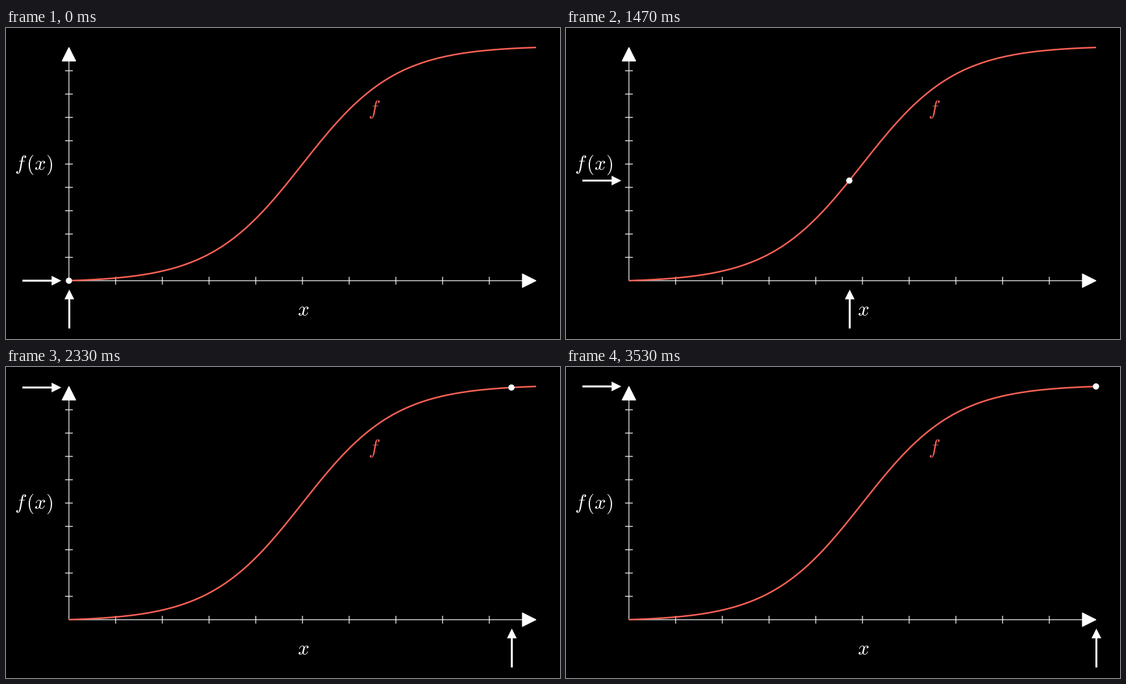
Animation of 854 by 480 pixels, one loop 3.97 s. Source, as a matplotlib script:

```python
import matplotlib.pyplot as plt
import numpy as np
from matplotlib.animation import FuncAnimation
from matplotlib.collections import LineCollection
from matplotlib.patches import Circle, Polygon

W, H, DPI = 854, 480, 64
PT = 72 / DPI                      # points per pixel
X0, Y0 = 97, 390                   # origin of the plot
XLEN, YLEN = 720, 360
WHITE, RED = "#ffffff", "#fc6255"
EM = 31                            # text size in pixels
TICK_MS = 10
LOOP_MS = 3970
MOVE_STEPS = 45                    # steps of 1/15 s

plt.rcParams["mathtext.fontset"] = "cm"

fig = plt.figure(figsize=(W / DPI, H / DPI), dpi=DPI, facecolor="black")
ax = fig.add_axes([0, 0, 1, 1])
ax.set_xlim(0, W)
ax.set_ylim(H, 0)
ax.axis("off")


def smooth(t, steep=10):
    """Sigmoid rescaled to run exactly from 0 to 1."""
    def sig(v):
        return 1 / (1 + np.exp(-v))
    low = sig(-steep / 2)
    return (sig(steep * (t - 0.5)) - low) / (1 - 2 * low)


def point(u):
    return X0 + XLEN * u, Y0 - YLEN * smooth(u)


def head(apex, along, size=21):
    """Triangle with its apex at a point, facing a unit direction."""
    apex, along = np.array(apex), np.array(along)
    side = along[::-1] * size / 2
    base = apex - along * size
    return [apex, base + side, base - side]


def arrow(tip, along, length=60, size=15, width=3):
    """Outline of a solid arrow."""
    tip, along = np.array(tip), np.array(along)
    side = along[::-1]
    base, tail = tip - along * size, tip - along * length
    s, b = side * width / 2, side * size / 2
    return [tip, base + b, base + s, tail + s, tail - s, base - s, base - b]


def label(x, baseline, text, color=WHITE):
    ax.text(x, baseline, text, color=color, fontsize=EM * PT,
            ha="left", va="baseline")


# Axes with ticks
lines = [[(X0, Y0), (X0 + XLEN - 21, Y0)], [(X0, Y0), (X0, Y0 - YLEN + 21)]]
for i in range(1, 10):
    x, y = X0 + i * XLEN / 10, Y0 - i * YLEN / 10
    lines += [[(x, Y0 - 6), (x, Y0 + 6)], [(X0 - 6, y), (X0 + 6, y)]]
ax.add_collection(LineCollection(lines, colors=WHITE, linewidths=1.2 * PT,
                                 capstyle="butt", snap=False, zorder=1))
for apex, along in (((X0 + XLEN, Y0), (1, 0)), ((X0, Y0 - YLEN), (0, -1))):
    ax.add_patch(Polygon(head(apex, along), fc=WHITE, ec=WHITE, lw=1.2 * PT,
                         joinstyle="miter", snap=False, zorder=1))

ax.plot(*point(np.linspace(0, 1, 201)), color=RED, lw=2.4 * PT,
        solid_capstyle="butt", zorder=2)

label(13, 218.3, r"$f\hspace{0.12}(x)$")
label(448.7, 444.5, "$x$")
label(557.6, 133.7, "$f$", RED)

# Moving parts
style = dict(fc=WHITE, lw=0, snap=False, zorder=4)
across = ax.add_patch(Polygon(arrow((85, Y0), (1, 0)), **style))
upward = ax.add_patch(Polygon(arrow((X0, 404), (0, -1)), **style))
dot = ax.add_patch(Circle((X0, Y0), 4.8, **style))


def update(i):
    step = min((3 * i + 1) // 20, MOVE_STEPS)
    x, y = point(smooth(step / MOVE_STEPS))
    dot.center = x, y
    across.set_xy(arrow((85.3, y), (1, 0)))
    upward.set_xy(arrow((x + 0.6, 403.7), (0, -1)))
    return across, upward, dot


anim = FuncAnimation(fig, update, frames=LOOP_MS // TICK_MS, interval=TICK_MS,
                     repeat=True, repeat_delay=0, blit=False)
plt.show()
```
